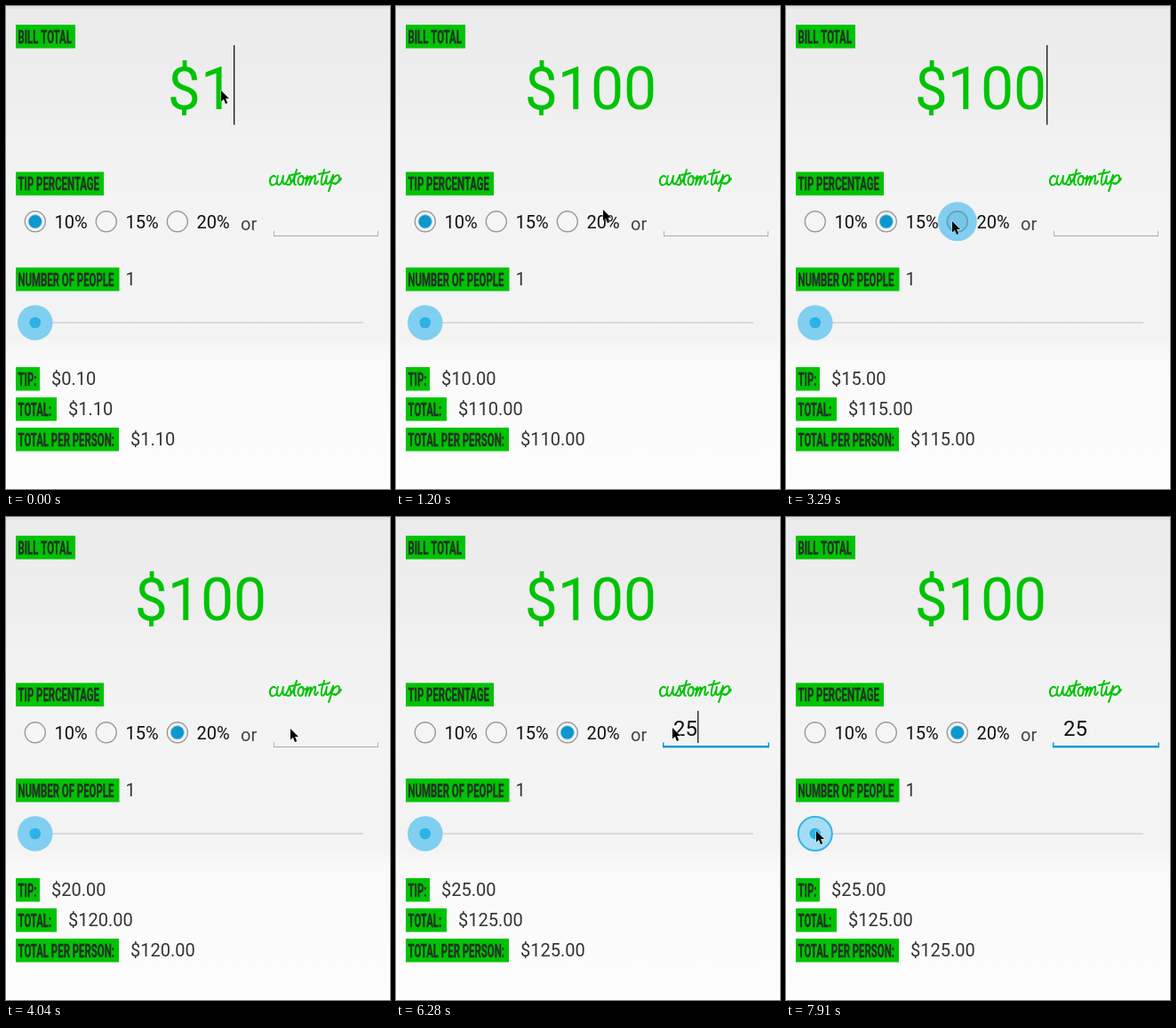
An HTML page with a canvas that plays this animation: 432 by 543 pixels, repeating every 8000 ms.

```html
<!DOCTYPE html>
<html lang="en">
<head>
<meta charset="utf-8">
<title>Tip calculator</title>
<style>
  html, body { margin: 0; width: 100%; height: 100%; overflow: hidden; background: #f3f3f3; }
  canvas { display: block; width: 432px; height: 543px; }
</style>
</head>
<body>
<canvas id="stage" width="432" height="543"></canvas>
<script>
const W = 432, H = 543, LOOP = 8000, TICK = 149.2;
const GREEN = '#00c305', BLUE = '#0a98cd', SKY = '#33b5e5';
const FACE = 'Roboto, "Open Sans", sans-serif';

const canvas = document.getElementById('stage');
const ctx = canvas.getContext('2d');
const dpr = window.devicePixelRatio || 1;
canvas.width = W * dpr;
canvas.height = H * dpr;

// Pointer stops: tick, x, y
const route = [
  [0, 242, 95], [5, 242, 95], [8, 233, 229], [11, 128, 254], [13, 110, 254],
  [15, 110, 254], [18, 180, 244], [20, 187, 242], [24, 187, 242], [27, 320, 238],
  [28, 320, 238], [29, 311, 237], [42, 311, 237], [48, 29, 351], [49, 34, 353]
];

// Ticks during which each text caret is lit
const billBlink = [[0, 5], [9, 12], [15, 19], [22, 25]];
const tipBlink = [[29, 32], [34, 39], [42, 45], [49, 52]];

// Handwritten caption, one pen path per word
const penCustom = new Path2D(
  'M303 192C301 189 296 193 297 198C298 203 302 202 305 198' +
  'M306 191C304 196 304 201 307 201C310 201 311 195 312 191C311 196 311 201 314 200' +
  'Q317 197 319 190C319 194 322 198 320 200Q318 202 315 200' +
  'M320 200Q324 195 327 184C325 190 322 201 326 201M321 190L331 188' +
  'M333 191C328 191 327 201 331 201C335 201 336 191 333 191Q334 195 338 193' +
  'M339 191L337 201C339 195 342 190 343 192Q343 195 341 201' +
  'C343 195 346 190 348 191C349 194 345 201 349 200L351 197');
const penTip = new Path2D(
  'M358 184C356 190 353 200 356 201C358 201 360 196 361 191M352 189L363 187' +
  'M361 191C360 196 359 200 362 200Q365 199 368 190Q366 201 363 208' +
  'M367 196C369 191 374 188 375 192C376 197 371 202 368 199Q373 201 377 194' +
  'M364 186L364 186.2');

const arrow = new Path2D('M0 0V12.4L2.9 9.8L5 15L7.2 14L5.1 9.1H9Z');

const lit = (spans, n) => spans.some(([a, b]) => n >= a && n < b);
const money = v => '$' + v.toFixed(2);

function pointerAt(n) {
  let i = 0;
  while (i < route.length - 1 && route[i + 1][0] <= n) i++;
  const a = route[i], b = route[i + 1] || a;
  const k = b === a ? 0 : (n - a[0]) / (b[0] - a[0]);
  return [a[1] + (b[1] - a[1]) * k, a[2] + (b[2] - a[2]) * k];
}

function stateAt(t) {
  const n = Math.floor(t / TICK);
  const digits = ['1', '10'][n] || '100';
  const custom = n < 34 ? '' : n < 35 ? '2' : '25';
  const choice = n < 15 ? 0 : n < 23 ? 1 : 2;
  return {
    n, digits, custom, choice,
    rate: custom ? +custom : [10, 15, 20][choice],
    touch: n === 14 ? 1 : n === 22 ? 2 : -1,
    focus: n >= 29,
    held: n >= 53
  };
}

function text(str, x, y, size, color) {
  ctx.font = `${size}px ${FACE}`;
  ctx.fillStyle = color;
  ctx.fillText(str, x, y);
}

function rect(x, y, w, h, color) {
  ctx.fillStyle = color;
  ctx.fillRect(x, y, w, h);
}

function disc(x, y, r, fill, line, width) {
  ctx.beginPath();
  ctx.arc(x, y, r, 0, Math.PI * 2);
  if (fill) {
    ctx.fillStyle = fill;
    ctx.fill();
  }
  if (line) {
    ctx.strokeStyle = line;
    ctx.lineWidth = width;
    ctx.stroke();
  }
}

// Condensed caps on a green tag
function tag(str, y, w) {
  rect(11, y, w, 26.5, GREEN);
  ctx.save();
  ctx.translate(13.5, y + 20.5);
  ctx.scale(0.57, 1);
  ctx.font = `bold 20px ${FACE}`;
  ctx.fillStyle = ctx.strokeStyle = '#253025';
  ctx.lineWidth = 0.4;
  ctx.fillText(str, 0, 0);
  ctx.strokeText(str, 0, 0);
  ctx.restore();
}

function backdrop() {
  const g = ctx.createLinearGradient(0, 0, 0, H);
  const stops = [[0, '#ebebeb'], [105, '#eeeeee'], [135, '#f1f1f1'], [250, '#f4f4f4'],
    [370, '#f3f3f3'], [395, '#f9f9f9'], [H, '#fdfdfd']];
  for (const [y, c] of stops) g.addColorStop(y / H, c);
  rect(0, 0, W, H, g);
  rect(0, 0, W, 3, '#e2e2e2');
}

function bill(s) {
  const str = '$' + s.digits, mid = 218.92;
  ctx.font = `66px ${FACE}`;
  const half = ctx.measureText(str).width / 2;
  text(str, mid - half, 115.5, 66, GREEN);
  if (lit(billBlink, s.n)) rect(Math.floor(mid + half), 44, 1.3, 89.5, '#111');
}

function radios(s) {
  ['10%', '15%', '20%'].forEach((label, i) => {
    const x = 32.8 + i * 80, y = 242.3;
    if (s.touch === i) disc(x, y, 22, '#82cef0');
    disc(x, y, 11.5, s.touch === i ? '#76c5ea' : '#f5f5f5',
      s.touch === i ? '#5f98b0' : '#999', 1.4);
    if (s.choice === i) disc(x, y, 7.6, BLUE, '#8cc8e2', 0.8);
    text(label, 54.5 + i * 80, 250, 20, '#111');
  });
  text('or', 264, 252, 20, '#444');
}

function field(s) {
  ctx.strokeStyle = GREEN;
  ctx.lineWidth = 2;
  ctx.lineCap = ctx.lineJoin = 'round';
  ctx.stroke(penCustom);
  ctx.stroke(penTip);

  if (s.focus) {
    rect(300, 257, 120, 2.4, BLUE);
    rect(300, 253.5, 1.5, 4, BLUE);
    rect(418.5, 253.5, 1.5, 4, BLUE);
  } else {
    rect(301, 258, 118, 1, '#a8a8a8');
    rect(301, 253, 1, 5, '#b5b5b5');
    rect(418, 253, 1, 5, '#b5b5b5');
  }
  ctx.font = `24px ${FACE}`;
  const end = 312 + ctx.measureText(s.custom).width;
  text(s.custom, 312, 246, 24, '#111');
  if (lit(tipBlink, s.n)) rect(Math.round(end), 218, 1.5, 36, '#333');
}

function slider(s) {
  text('1', 134.5, 314, 20, '#333');
  rect(33, 355.3, 369, 1.5, '#d2d2d2');
  if (s.held) disc(32.8, 356, 19, '#a5dcf4', SKY, 2);
  else disc(32.8, 356, 19.8, '#80cff0');
  disc(32.8, 356, 6.3, '#2db2e5');
}

function pointer(n) {
  const [x, y] = pointerAt(n);
  ctx.save();
  ctx.translate(x, y);
  ctx.lineWidth = 1;
  ctx.strokeStyle = 'rgba(255,255,255,.65)';
  ctx.stroke(arrow);
  ctx.fillStyle = '#000';
  ctx.fill(arrow);
  ctx.restore();
}

function draw(now) {
  const s = stateAt(now % LOOP);
  const tip = s.digits * s.rate / 100, total = +s.digits + tip;
  ctx.setTransform(dpr, 0, 0, dpr, 0, 0);
  backdrop();

  tag('BILL TOTAL', 21, 67);
  tag('TIP PERCENTAGE', 186.5, 99);
  tag('NUMBER OF PEOPLE', 294, 116.5);
  tag('TIP:', 406, 27);
  tag('TOTAL:', 440, 46);
  tag('TOTAL PER PERSON:', 474, 116);

  bill(s);
  radios(s);
  field(s);
  slider(s);

  text(money(tip), 51, 426, 20, '#333');
  text(money(total), 70, 460, 20, '#333');
  text(money(total), 140, 494, 20, '#333');
  pointer(s.n);
  requestAnimationFrame(draw);
}
requestAnimationFrame(draw);
</script>
</body>
</html>
```
